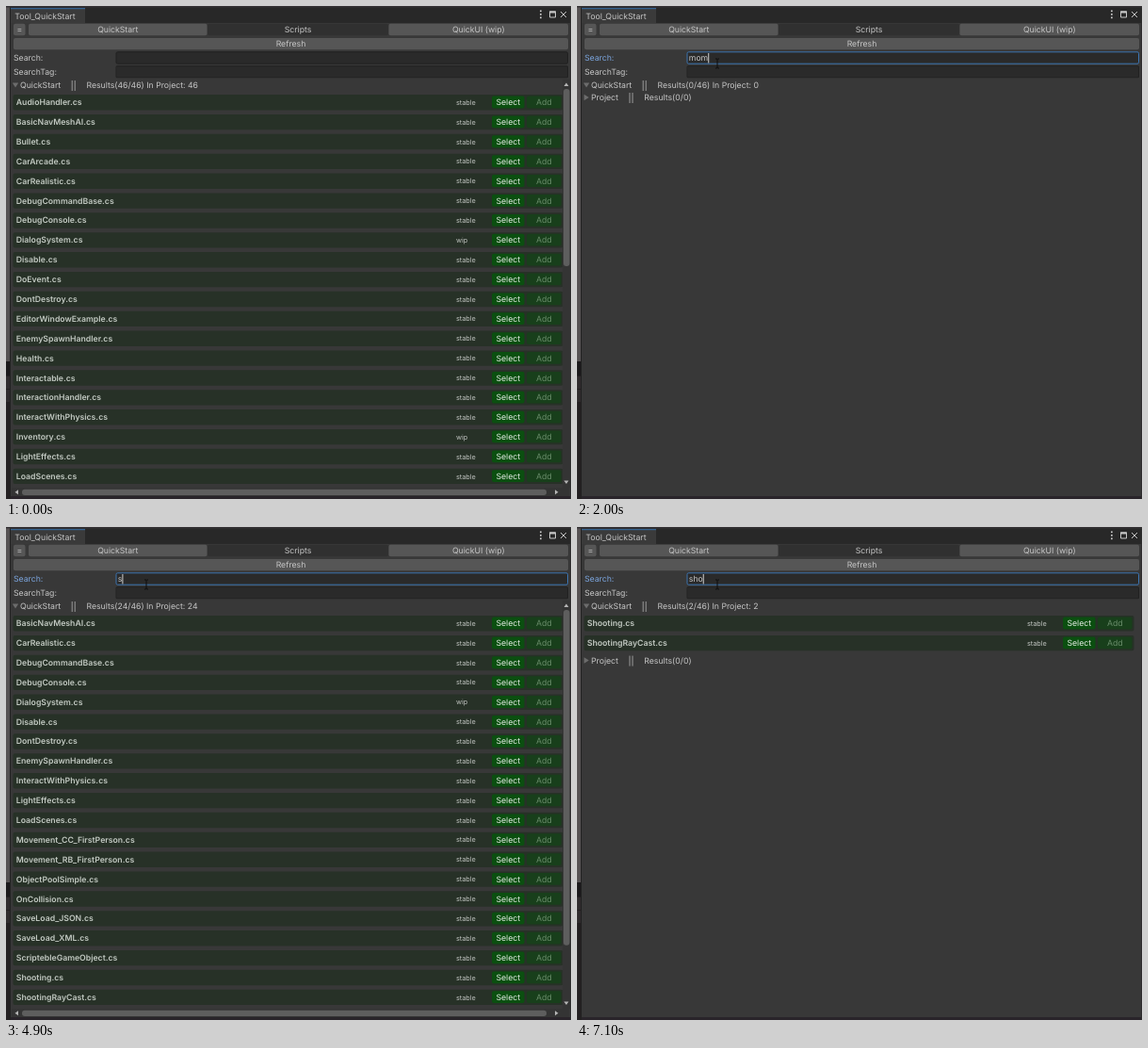
Recreate the animation shown at these times as an HTML page. Size 600x523 px, loop 7.2 s.

```html
<!DOCTYPE html>
<html lang="en">
<head>
<meta charset="utf-8">
<title>Script search</title>
<style>
html, body { margin: 0; width: 100%; height: 100%; overflow: hidden; background: #383838; }
svg { display: block; width: 600px; height: 523px; }
text { font: 8.7px Inter, sans-serif; fill: #c6c6c6; text-rendering: geometricPrecision; white-space: pre; }
.name { font-weight: 600; fill: #c3cac3; }
.tag { font-size: 7.3px; fill: #c0c4c0; }
.mid { text-anchor: middle; }
.select { fill: #e4ece4; }
.add { fill: #688b69; }
.on { fill: #7ba5de; }
</style>
</head>
<body>
<svg viewBox="0 0 600 523">
  <g id="frame"></g>
  <g id="list"></g>
  <g id="field">
    <rect id="ring" x="117" y="48.8" width="479.5" height="12.4" rx="1.5" fill="#2a2a2a"/>
    <text id="label" x="8" y="58.3">Search:</text>
    <text id="query" x="118.8" y="58.3"></text>
    <rect id="caret" y="50" width="1" height="10.5" fill="#d0d0d0"/>
  </g>
  <g id="arrow"><path d="M0 0V11.5L2.7 9L4.4 12.8L6.1 12L4.4 8.3H8Z" fill="#fff" stroke="#111" stroke-width=".7"/></g>
  <g id="beam"><path d="M-2 -5H-.6L0 -4.4L.6 -5H2M0 -4.4V4.4M-2 5H-.6L0 4.4L.6 5H2" fill="none" stroke="#0c0c0c"/></g>
</svg>
<script>
const LOOP = 7200, ROW = 20.88, FIRST = 102, VISIBLE = 20;

const moves = ['2D_Platformer', '2D_TopDown', 'Camera', 'CC_FirstPerson', 'CC_Platformer',
  'CC_TopDown', 'FreeCamera', 'RB_FirstPerson'].map(n => 'Movement_' + n);
const scripts = [
  ...('AudioHandler BasicNavMeshAI Bullet CarArcade CarRealistic DebugCommandBase DebugConsole ' +
    'DialogSystem Disable DoEvent DontDestroy EditorWindowExample EnemySpawnHandler Health ' +
    'Interactable InteractionHandler InteractWithPhysics Inventory LightEffects LoadScenes ' +
    'MenuHandler').split(' '),
  ...moves,
  ...('ObjectPool ObjectPoolSimple OnCollision PathFollow ReadAudioFile Rotation SaveLoad_JSON ' +
    'SaveLoad_XML ScriptebleGameObject Shooting ShootingRayCast StringFormats ' +
    'Tool_CreateHexagonMesh Tool_ScriptToString Tracker Turret UIEffects').split(' ')
];
const wip = ['DialogSystem', 'Inventory'];

// [time, search text]
const typing = [
  [0, ''], [1800, 'm'], [1900, 'mo'], [2000, 'mom'], [2400, 'mo'], [2500, 'mov'], [2700, 'move'],
  [2800, 'movem'], [3600, 'move'], [3700, 'mov'], [3800, 'mo'], [4000, 'm'], [4400, ''],
  [4800, 's'], [5000, 'sh'], [5200, 'sho']
];
const focusAt = 900, blinks = [[1200, 1700], [5900, 7100]];
const enter = { start: 100, end: 800, from: [-10, 150], to: [149, 61] };

const $ = id => document.getElementById(id);
const rect = (x, y, w, h, fill, rx = 0) =>
  `<rect x="${x}" y="${y}" width="${w}" height="${h}" rx="${rx}" fill="${fill}"/>`;
const text = (x, y, s, cls = '') => `<text x="${x}" y="${y + 3.2}" class="${cls}">${s}</text>`;
const path = (d, fill, stroke = 'none') => `<path d="${d}" fill="${fill}" stroke="${stroke}"/>`;
const button = (x, y, w, h, s, fill, cls = '') =>
  rect(x, y, w, h, fill, 2) + text(x + w / 2, y + h / 2, s, 'mid ' + cls);

function drawFrame() {
  $('frame').innerHTML =
    rect(0, 0, 600, 523, '#383838') +
    rect(0, 0, 5, 377, '#565253') + rect(0, 377, 5, 146, '#242022') +
    rect(0, 377, 5, 15, '#1b191b') + rect(0, 393, 5, 13, '#302c2e') + rect(0, 407, 5, 13, '#302c2e') +
    rect(4, 0, 1, 523, '#222') +
    rect(5, 0, 595, 18, '#282828') + rect(0, 0, 600, 1.5, '#343134') +
    rect(5, 2, 79, 16, '#3a3a3a') + rect(5, 2, 79, 1.3, '#36628f') +
    text(9.3, 10.7, 'Tool_QuickStart') +
    [5.2, 8.7, 12.2].map(y => rect(567, y - .7, 1.7, 1.7, '#c8c8c8')).join('') +
    path('M577.5 6H583.5V12H577.5Z', 'none', '#c8c8c8') + rect(577, 5.5, 7, 2, '#c8c8c8') +
    path('M589 6L595 12M595 6L589 12', 'none', '#c8c8c8') +
    button(8, 18.8, 12.5, 12.4, '=', '#565656') +
    button(24, 18.8, 189.5, 12.4, 'QuickStart', '#565656') +
    button(214, 18.8, 192, 12.4, 'Scripts', '#303030') +
    button(406.5, 18.8, 190.5, 12.4, 'QuickUI (wip)', '#565656') +
    button(8, 34, 589, 12.3, 'Refresh', '#565656') +
    text(8, 69.8, 'SearchTag:') +
    rect(116.5, 63.3, 480.5, 12.9, '#202020', 1.5) + rect(117.2, 64.2, 479, 11.4, '#2a2a2a', 1) +
    rect(5, 520, 595, 3, '#29242a') + rect(599, 18, 1, 505, '#2b292b');
}

function heading(y, title, barX, info, open) {
  const mark = open ? `M6.8 ${y - 2.5}h6.4l-3.2 5z` : `M7.5 ${y - 3.2}v6.4l5.2 -3.2z`;
  return path(mark, '#6c6c6c') + text(15, y, title) +
    rect(barX, y - 5, 1, 11, '#9a9a9a') + rect(barX + 3, y - 5, 1, 11, '#9a9a9a') +
    text(barX + 15.8, y, info);
}

function row(name, i) {
  const y = FIRST + ROW * i;
  return rect(7.5, y - 8, 584, 16.4, '#273127', 2) +
    text(10.8, y, name + '.cs', 'name') +
    text(478, y - .4, wip.includes(name) ? 'wip' : 'stable', 'tag') +
    button(516, y - 6.4, 34.5, 12.8, 'Select', '#0b4f10', 'select') +
    button(553, y - 6.4, 36.5, 12.8, 'Add', '#183f1b', 'add');
}

function scrollbars(count) {
  const thumb = 412 * 444 / (count * ROW + 13);
  return rect(591, 78, 8, 433, '#343434') + rect(592, 88, 6.5, thumb, '#5e5e5e', 3) +
    path('M592.5 85h5l-2.5 -3.5z M592.5 503.5h5l-2.5 3.5z', '#b5b5b5') +
    rect(6, 511, 592, 9, '#343434') + rect(17, 512.7, 557, 6.3, '#5e5e5e', 3) +
    path('M13 513.3v5l-3.5 -2.5z M583 513.3v5l3.5 -2.5z', '#b5b5b5');
}

function drawList(query) {
  const found = scripts.filter(n => n.toLowerCase().includes(query));
  const n = found.length;
  const info = `Results(${n}/${scripts.length}) In Project: ${n}`;
  $('list').innerHTML = heading(84, 'QuickStart', 69.7, info, true) +
    found.slice(0, VISIBLE).map(row).join('') +
    (n > VISIBLE ? scrollbars(n)
      : heading(n ? 99.8 + ROW * n : 97, 'Project', 55.5, 'Results(0/0)', false));
  $('query').textContent = query;
  $('caret').setAttribute('x', 118.8 + (query ? $('query').getComputedTextLength() : 0));
}

function drawPointer(t) {
  const p = Math.min(1, Math.max(0, (t - enter.start) / (enter.end - enter.start)));
  const ease = 1 - (1 - p) ** 2;
  const [x, y] = enter.from.map((a, i) => a + (enter.to[i] - a) * ease);
  const inField = x > 117 && y < 76;
  for (const [id, shown] of [['arrow', !inField], ['beam', inField]]) {
    $(id).setAttribute('transform', `translate(${x} ${y})`);
    $(id).style.display = shown ? '' : 'none';
  }
}

let shownQuery = null;
function draw(now) {
  const t = now % LOOP;
  const query = typing.filter(([at]) => at <= t).pop()[1];
  if (query !== shownQuery) drawList(shownQuery = query);
  const focus = t >= focusAt;
  $('ring').setAttribute('stroke', focus ? '#3c74b0' : '#202020');
  $('label').setAttribute('class', focus ? 'on' : '');
  const off = blinks.some(([a, b]) => t >= a && t < b);
  $('caret').style.display = focus && !off ? '' : 'none';
  drawPointer(t);
}

drawFrame();
const start = performance.now();
function tick() {
  draw(performance.now() - start);
  requestAnimationFrame(tick);
}
tick();
</script>
</body>
</html>
```
